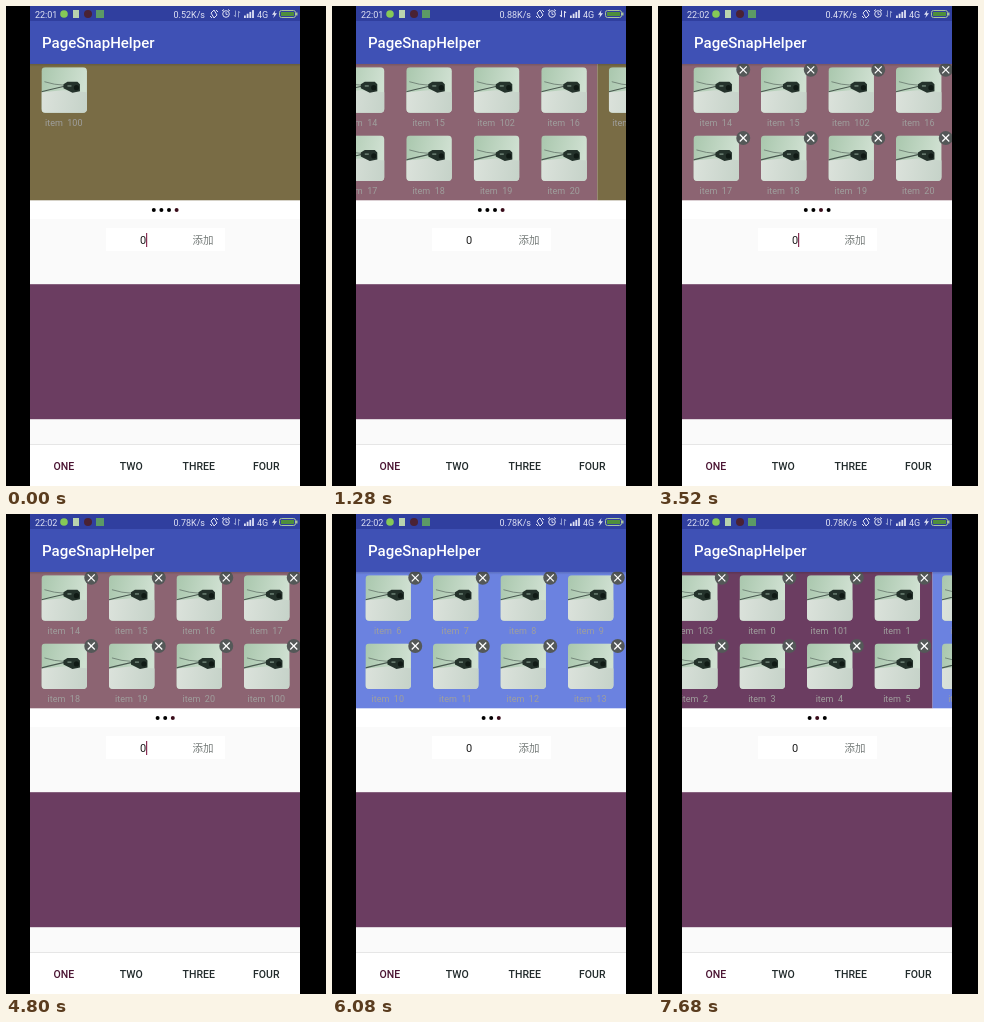
Animation of 320x480 px, one loop 8000 ms. Source, as an HTML page with a canvas:

```html
<!DOCTYPE html>
<html lang="en">
<head>
<meta charset="utf-8">
<title>PageSnapHelper</title>
<style>
html, body { margin: 0; width: 100%; height: 100%; overflow: hidden; background: #000; }
canvas { display: block; width: 100vw; height: 100vh; }
</style>
</head>
<body>
<canvas id="stage"></canvas>
<script>
const W = 320, H = 480, LOOP = 8000, STEP = 320;
const LEFT = 24, PAGE = 270, CELL = PAGE / 4;
const PAGER_TOP = 57.8, PAGER_BOTTOM = 194.6;
const PAGES = [
  { color: '#6b3d61', inset: -2 },
  { color: '#6b82e0', inset: -2 },
  { color: '#8c6472', inset: 0 },
  { color: '#796c45', inset: 0 }
];
const EDIT_STEP = 11, DELETE_STEP = 15;
const range = (a, b) => Array.from({ length: b - a + 1 }, (_, i) => a + i);
const ITEMS = [103, 0, 101, ...range(1, 15), 102, ...range(16, 20), 100];
// Each swipe moves one page back with a decelerating ease.
const SWIPES = [
  { start: 1, steps: 4.45 },
  { start: 15, steps: 4 },
  { start: 21, steps: 4.1 }
];

const canvas = document.getElementById('stage');
const ctx = canvas.getContext('2d');
const scale = window.devicePixelRatio || 1;
canvas.width = W * scale;
canvas.height = H * scale;

function rect(x, y, w, h, color) {
  ctx.fillStyle = color;
  ctx.fillRect(x, y, w, h);
}

function disc(x, y, r, color) {
  ctx.fillStyle = color;
  ctx.beginPath();
  ctx.arc(x, y, r, 0, Math.PI * 2);
  ctx.fill();
}

function poly(points, color) {
  ctx.fillStyle = color;
  ctx.beginPath();
  points.forEach(([x, y]) => ctx.lineTo(x, y));
  ctx.closePath();
  ctx.fill();
}

function line(points, color, width) {
  ctx.strokeStyle = color;
  ctx.lineWidth = width;
  ctx.beginPath();
  points.forEach(([x, y], i) => i ? ctx.lineTo(x, y) : ctx.moveTo(x, y));
  ctx.stroke();
}

function text(str, x, y, size, color, align = 'left', weight = 400, family = 'Roboto') {
  ctx.font = `${weight} ${size}px "${family}", sans-serif`;
  ctx.textAlign = align;
  ctx.fillStyle = color;
  ctx.fillText(str, x, y);
}

function gradient(x0, y0, x1, y1, from, to) {
  const fill = ctx.createLinearGradient(x0, y0, x1, y1);
  fill.addColorStop(0, from);
  fill.addColorStop(1, to);
  return fill;
}

function clipped(path, draw) {
  ctx.save();
  ctx.beginPath();
  path();
  ctx.clip();
  draw();
  ctx.restore();
}

function scrollPosition(step) {
  return SWIPES.reduce((pos, { start, steps }) => {
    const p = Math.min(1, Math.max(0, (step - start) / steps));
    return pos - (1 - (1 - p) ** 2);
  }, 3);
}

function thumbnail(x, y) {
  ctx.save();
  ctx.translate(x, y);
  clipped(() => ctx.roundRect(0, 0, 45.5, 45.5, 4), () => {
    rect(0, 0, 46, 46, gradient(0, 0, 45, 10, '#a9c7ad', '#cfe0d1'));
    poly([[0, 25], [22, 23], [46, 25], [46, 46], [0, 46]],
      gradient(0, 30, 45, 36, '#dbe2db', '#c6d3c9'));
    line([[3, 14.5], [13, 17], [23, 18]], '#66776c', .8);
    line([[0, 24.5], [8, 22.5], [23, 19]], '#4a5a51', 1.1);
    poly([[22, 17], [26, 14.5], [36, 14.5], [38.5, 17], [38.5, 24], [31, 25.5], [22, 21]], '#24322b');
    rect(26, 18, 4, 1.5, '#6c8074');
    disc(35, 20.5, 2.6, '#101a15');
  });
  ctx.restore();
}

function badge(x, y) {
  disc(x, y, 7, '#545858');
  line([[x - 3.5, y - 3.5], [x + 3.5, y + 3.5]], '#fff', 1.2);
  line([[x + 3.5, y - 3.5], [x - 3.5, y + 3.5]], '#fff', 1.2);
}

function drawPager(items, pos, editing) {
  clipped(() => ctx.rect(LEFT, PAGER_TOP, PAGE, PAGER_BOTTOM - PAGER_TOP), () => {
    PAGES.forEach(({ color, inset }, page) => {
      const x0 = LEFT + (page - pos) * PAGE;
      if (Math.abs(page - pos) >= 1) return;
      rect(x0, PAGER_TOP, PAGE, PAGER_BOTTOM - PAGER_TOP, color);
      items.slice(page * 8, page * 8 + 8).forEach((id, i) => {
        const cx = x0 + inset + (i % 4 + .5) * CELL;
        const y = 61.2 + Math.floor(i / 4) * 68.2;
        thumbnail(cx - 22.3, y);
        text('item  ' + id, cx, y + 58.7, 9, '#9f9f9d', 'center');
        if (editing) badge(cx + 27.5, y + 2.6);
      });
    });
    rect(LEFT, PAGER_TOP, PAGE, 3,
      gradient(0, PAGER_TOP, 0, PAGER_TOP + 3, 'rgba(0,0,0,.15)', 'rgba(0,0,0,0)'));
  });
}

function drawDots(count, active) {
  for (let i = 0; i < count; i++) {
    disc(159.2 + (i - (count - 1) / 2) * 7.6, 204, 2, i === active ? '#3a0c1a' : '#000');
  }
}

function drawStatusBar(step) {
  const ink = '#dfe2f4';
  rect(LEFT, 0, PAGE, 15, '#303f9f');
  text(step < 10 ? '22:01' : '22:02', 29, 11.5, 9, ink);
  disc(58, 8, 3.8, '#86c957');
  rect(67, 4, 6, 8, '#b9d3ae');
  disc(82, 8, 4, '#4a2234');
  rect(90, 4, 8, 8, '#5c9a66');

  const speed = step < 1 ? '0.52' : step < 9 ? '0.88' : step < 14 ? '0.47' : '0.78';
  text(speed + 'K/s', 199, 11.5, 9, ink, 'right');

  line([[205, 7], [208, 4], [211, 9], [208, 12], [205, 7]], ink, 1);
  line([[204, 10], [206, 12]], ink, 1);
  line([[210, 4], [212, 6]], ink, 1);
  ctx.beginPath();
  ctx.arc(220, 8, 3.3, 0, Math.PI * 2);
  ctx.stroke();
  line([[220, 6], [220, 8.4], [221.7, 8.4]], ink, .9);
  line([[216, 5], [218, 3.5]], ink, 1);
  line([[222, 3.5], [224, 5]], ink, 1);

  const data = step >= 1 && step < 9 ? ink : '#8f9bd0';
  line([[229.5, 4.5], [229.5, 11], [228, 9]], data, 1);
  line([[232.5, 11.5], [232.5, 5], [234, 7]], data, 1);
  for (let i = 0; i < 4; i++) rect(238 + i * 2.7, 9.5 - i * 1.8, 1.8, 2.5 + i * 1.8, ink);
  text('4G', 251, 11.5, 9, ink);
  poly([[269.5, 4], [266, 8.7], [268.2, 8.7], [267.3, 12], [271, 7.3], [268.7, 7.3]], ink);

  ctx.strokeStyle = '#a9c49d';
  ctx.lineWidth = 1;
  ctx.beginPath();
  ctx.roundRect(273.5, 4.5, 16, 7, 2);
  ctx.stroke();
  rect(275, 6, 13, 4, '#4f8f3c');
  rect(290, 6.5, 1.5, 3, '#a9c49d');
}

function drawInput(step) {
  rect(100, 222, 119, 23, '#fff');
  text('0', 137, 238, 11, '#1c1c1c', 'center');
  text('添加', 197, 238, 10.5, '#747a78', 'center', 400, 'Noto Sans CJK SC');
  const phase = step * .39 % 1;
  if (phase < .3 || phase > .72) rect(140, 227, 1.2, 14, '#8a3156');
}

function drawTabs() {
  rect(LEFT, 438, PAGE, 1, '#e6e6e6');
  rect(LEFT, 439, PAGE, 41, '#fff');
  ['ONE', 'TWO', 'THREE', 'FOUR'].forEach((name, i) => {
    text(name, LEFT + (i + .5) * CELL, 463.5, 10.5, i ? '#222b2c' : '#4a1432', 'center', 500);
  });
}

function draw(time) {
  const step = Math.floor(time % LOOP / STEP);
  const items = step < DELETE_STEP ? ITEMS : ITEMS.filter(id => id !== 102);
  const pos = scrollPosition(step);

  ctx.setTransform(canvas.width / W, 0, 0, canvas.height / H, 0, 0);
  rect(0, 0, W, H, '#000');
  clipped(() => ctx.rect(LEFT, 0, PAGE, H), () => {
    rect(LEFT, 0, PAGE, H, '#fafafa');
    drawStatusBar(step);
    rect(LEFT, 15, PAGE, 43, '#3f51b5');
    text('PageSnapHelper', 36, 42, 15, '#fff', 'left', 500);
    rect(LEFT, 194, PAGE, 19, '#fff');
    drawPager(items, pos, step >= EDIT_STEP);
    // The indicator stays on the old page until the swipe has settled.
    const settled = SWIPES.filter(({ start, steps }) => step > start + steps).length;
    drawDots(Math.ceil(items.length / 8), 3 - settled);
    drawInput(step);
    rect(LEFT, 278.2, PAGE, 135, '#6b3d61');
    drawTabs();
  });
}

const begin = performance.now();
function tick() {
  draw(performance.now() - begin);
  requestAnimationFrame(tick);
}
tick();
</script>
</body>
</html>
```
